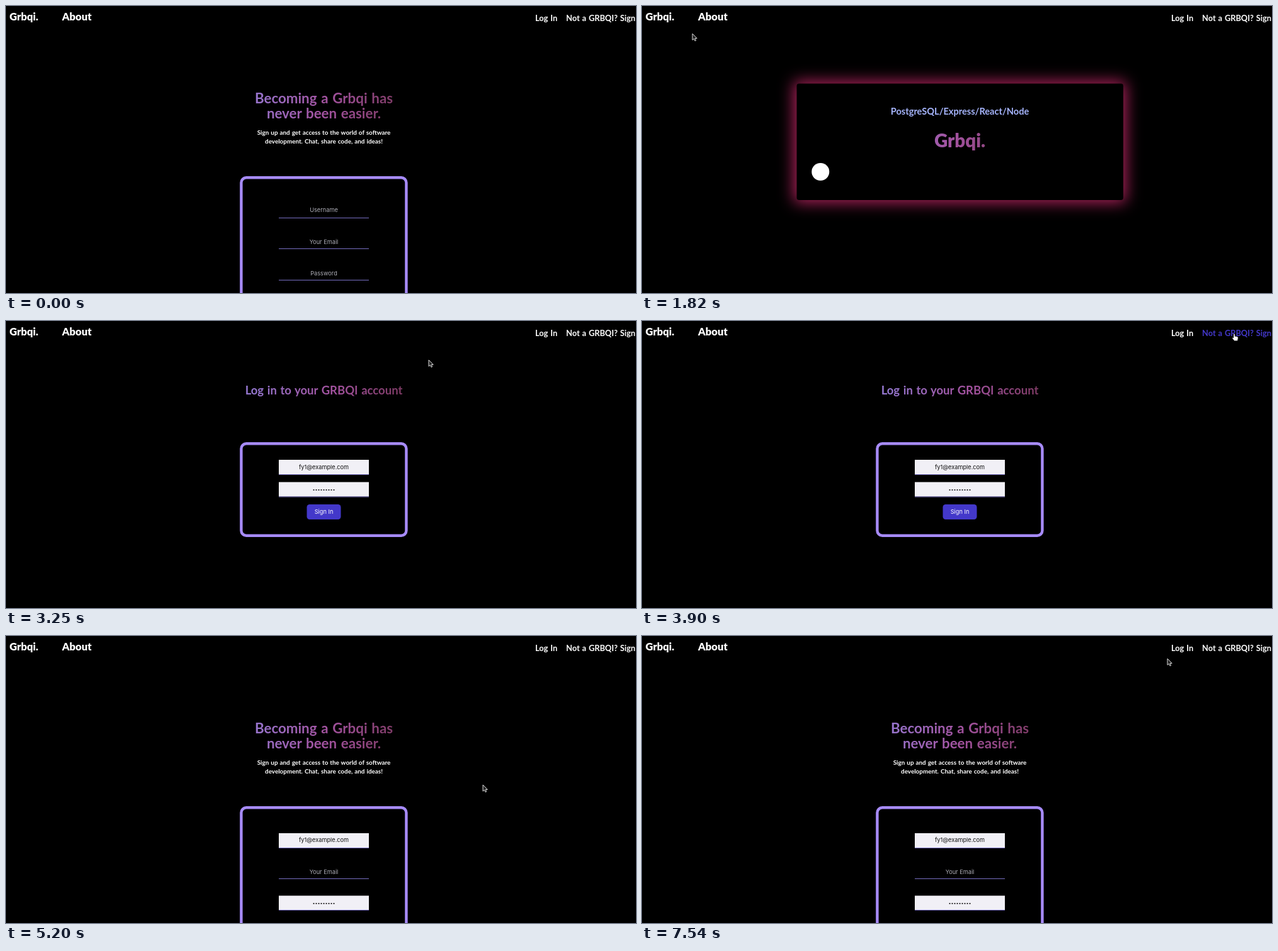
Animation of 1000x457 px, one loop 8 s. Source, as an HTML page:

```html
<!DOCTYPE html>
<html lang="en">
<head>
<meta charset="utf-8">
<title>Sign up walkthrough</title>
<style>
  html, body { margin: 0; width: 100%; height: 100%; overflow: hidden; background: #000; }
  svg { display: block; width: 100vw; height: 100vh; }
  text { font: 700 17px Lato, "Open Sans", sans-serif; fill: #fff; word-spacing: .06em; }
  .mid { text-anchor: middle; }
  .title { fill: url(#fade); }
  .nav { font-size: 16.6px; font-weight: 900; }
  .link { font-size: 12.8px; }
  .h1 { font-size: 22.3px; }
  .lead { font-size: 9.9px; }
  .stack { font-size: 14.6px; fill: #a5b4fc; }
  .brand { font-size: 29.5px; font-weight: 900; }
  .h2 { font-size: 18.5px; }
  .field { font: 400 9.2px Inter, "Liberation Sans", sans-serif; text-anchor: middle; word-spacing: 0; }
  .hint { fill: #adadb6; }
  .value { fill: #111; }
  .hover { fill: #4338ca; }
  .card { fill: none; stroke: #a78bfa; stroke-width: 4.4; }
  .line { fill: #7870c4; }
  .filled { fill: #f1f0f6; }
</style>
</head>
<body>
<svg viewBox="0 0 1000 457" preserveAspectRatio="none">
  <defs>
    <linearGradient id="fade" gradientUnits="userSpaceOnUse" x1="388" y1="130" x2="625" y2="180">
      <stop stop-color="#9577d0"/>
      <stop offset=".5" stop-color="#a2529f"/>
      <stop offset="1" stop-color="#7a385f"/>
    </linearGradient>
    <filter id="blur" x="-20%" y="-40%" width="140%" height="180%" color-interpolation-filters="sRGB">
      <feGaussianBlur stdDeviation="12"/>
    </filter>
    <g id="dots" fill="#111"></g>
  </defs>

  <text class="nav" x="5.5" y="23">Grbqi.</text>
  <text id="aboutLink" class="nav" x="89" y="23">About</text>
  <text id="loginLink" class="link" x="840" y="23.7">Log In</text>
  <text id="joinLink" class="link" x="889" y="23.7">Not a GRBQI? Sign up</text>

  <g id="join">
    <text class="mid title h1" x="504.5" y="154.5">Becoming a Grbqi has</text>
    <text class="mid title h1" x="504.5" y="178.5">never been easier.</text>
    <text class="mid lead" x="504.5" y="205">Sign up and get access to the world of software</text>
    <text class="mid lead" x="504.5" y="219">development. Chat, share code, and ideas!</text>
    <rect class="card" x="373.4" y="273.3" width="262" height="300" rx="8"/>
    <g id="empty">
      <text class="field hint" x="504.5" y="328">Username</text>
      <text class="field hint" x="504.5" y="428.5">Password</text>
    </g>
    <text class="field hint" x="504.5" y="378.5">Your Email</text>
    <g id="full">
      <rect class="filled" x="433" y="314" width="143" height="23"/>
      <text class="field value" x="504.5" y="328">fy1@example.com</text>
      <rect class="filled" x="433" y="413.5" width="143" height="23"/>
      <use href="#dots" y="426"/>
    </g>
    <rect class="line" x="433" y="337" width="143" height="1"/>
    <rect class="line" x="433" y="386" width="143" height="1"/>
    <rect class="line" x="433" y="436" width="143" height="1"/>
  </g>

  <g id="about">
    <rect x="241" y="120" width="527" height="193" rx="6" fill="#b0225c" filter="url(#blur)"/>
    <rect x="245.5" y="123.5" width="518.5" height="185.5" rx="4"/>
    <text class="mid stack" x="504.5" y="173">PostgreSQL/Express/React/Node</text>
    <text class="mid title brand" x="504.5" y="225">Grbqi.</text>
    <circle cx="283.3" cy="264" r="14" fill="#fff"/>
  </g>

  <g id="login">
    <text class="mid title h2" x="504.5" y="116.5">Log in to your GRBQI account</text>
    <rect class="card" x="373.4" y="195.3" width="262" height="146.4" rx="8"/>
    <rect class="filled" x="433" y="221" width="143" height="23"/>
    <rect class="line" x="433" y="244" width="143" height="1"/>
    <text class="field value" x="504.5" y="236">fy1@example.com</text>
    <rect class="filled" x="433" y="256.5" width="143" height="23"/>
    <rect class="line" x="433" y="279.5" width="143" height="1"/>
    <use href="#dots" y="269"/>
    <rect x="477.5" y="292" width="54" height="24" rx="4.5" fill="#4338ca"/>
    <text class="field" x="504.5" y="307.2">Sign In</text>
  </g>

  <g id="cursor">
    <path id="arrow" d="M0 0V10.2L2.4 8.2 4 11.6 5.7 10.8 4.2 7.5H7.2Z" fill="#222" stroke="#ddd"/>
    <path id="hand" d="M-1 1Q0-.7 1 1V4.2L5 5Q6.3 5.4 6.2 7L5.2 11.5H.2L-3 7.6Q-3 6-1 7Z"
      fill="#fff" stroke="#333" stroke-width=".6"/>
  </g>
</svg>
<script>
const LOOP = 8000, TICK = 130;
const $ = id => document.getElementById(id);
const show = (id, on) => $(id).style.display = on ? '' : 'none';

$('dots').innerHTML = Array.from({ length: 9 }, (_, i) =>
  `<circle cx="${488.5 + i * 4}" r="1.1"/>`).join('');

// Pointer stops: time, x, y
const stops = [
  [260, 190, -14], [1040, 119, 18], [1430, 119, 18], [1820, 80, 44],
  [2080, 80, 44], [2470, 856, 20], [2730, 856, 20], [3250, 671, 62],
  [3510, 671, 62], [3900, 940, 20], [4420, 940, 20], [5200, 757, 237],
  [6240, 757, 237], [6500, 778, 205], [6760, 778, 205], [7540, 834, 36]
];

// Pages: start time, id
const pages = [[0, 'join'], [1430, 'about'], [2860, 'login'], [4030, 'join']];

// Links: id, left, right
const links = [['aboutLink', 89, 137], ['loginLink', 840, 875], ['joinLink', 889, 1000]];

function pointer(t) {
  const i = stops.findIndex(s => s[0] > t);
  if (i < 0) return stops[stops.length - 1].slice(1);
  if (i === 0) return stops[0].slice(1);
  const [t0, x0, y0] = stops[i - 1], [t1, x1, y1] = stops[i];
  const p = (t - t0) / (t1 - t0), k = p * p * (3 - 2 * p);
  return [x0 + (x1 - x0) * k, y0 + (y1 - y0) * k];
}

function draw(now) {
  const t = Math.floor(now % LOOP / TICK) * TICK;
  const page = pages.filter(p => p[0] <= t).pop()[1];
  for (const id of ['join', 'about', 'login']) show(id, id === page);
  const filled = t >= 4680;
  show('full', filled);
  show('empty', !filled);

  const [x, y] = pointer(t);
  let over = false;
  for (const [id, left, right] of links) {
    const hit = x >= left && x <= right && y > 8 && y < 28;
    $(id).classList.toggle('hover', hit);
    over = over || hit;
  }
  show('hand', over);
  show('arrow', !over);
  $('cursor').setAttribute('transform', `translate(${x} ${y})`);
}

const start = performance.now();
function tick() {
  draw(performance.now() - start);
  requestAnimationFrame(tick);
}
tick();
</script>
</body>
</html>
```
